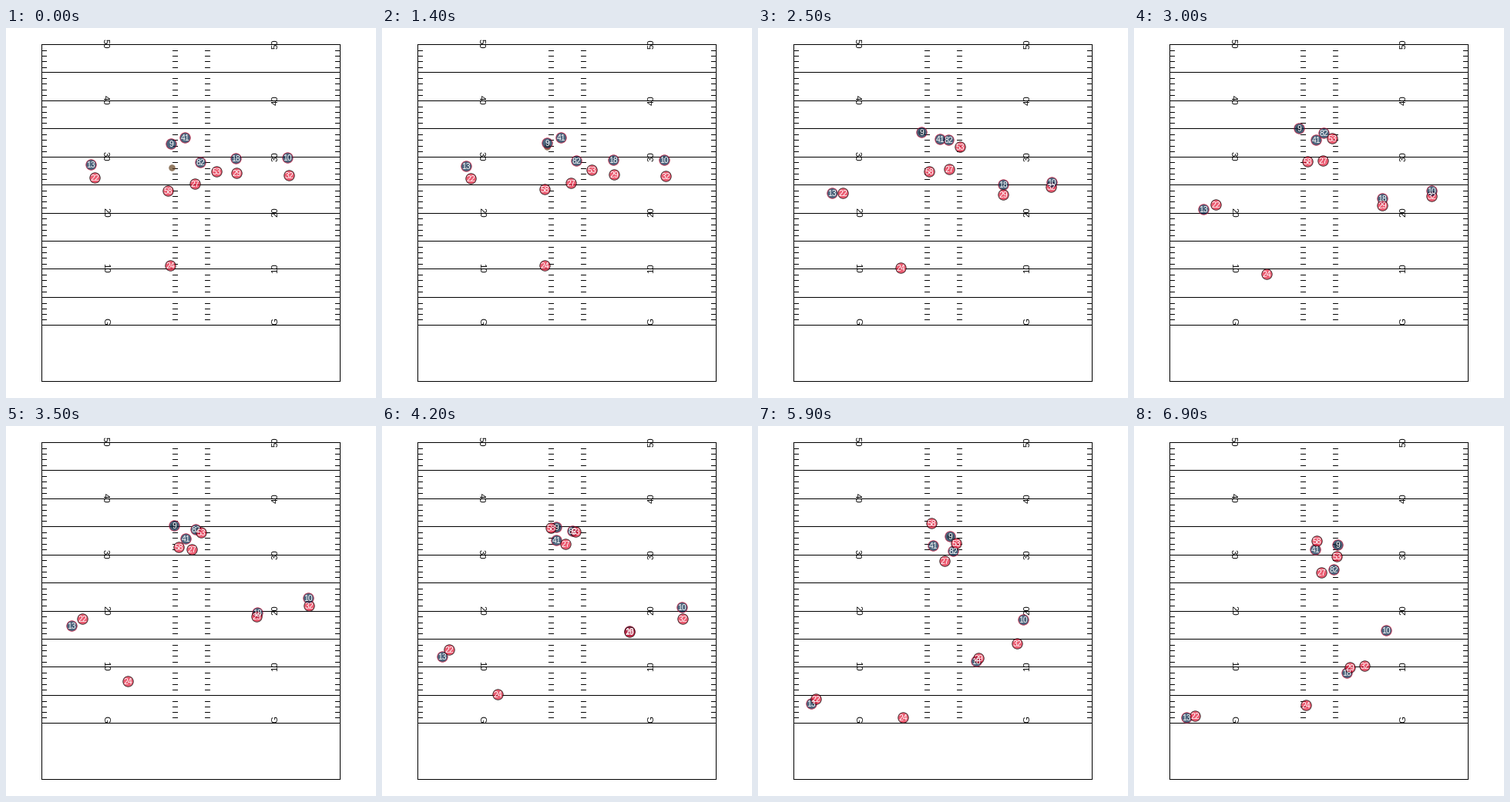
These frames come from a looping animation (480x480 px, 7000 ms). A matplotlib script:

```python
import numpy as np
import matplotlib as mpl
import matplotlib.pyplot as plt
from matplotlib.animation import FuncAnimation
from matplotlib.colors import to_rgba
from matplotlib.patches import Circle

mpl.rcParams["font.family"] = "Liberation Sans"

SIZE, DPI = 480, 72
FRAMES, STEP = 70, 100
LEFT, RIGHT, TOP, BOTTOM = 46, 433, 21, 458
YARD = (BOTTOM - TOP) / 60
RED = ("#e31837", "black")
BLUE = ("#002244", "#c60c30")
BROWN = "#654321"
SNAP, FLIGHT = 0.9, 0.6
GO, END = 1.1, 6.9

fig = plt.figure(figsize=(SIZE / DPI, SIZE / DPI), dpi=DPI, facecolor="white")
ax = fig.add_axes([0, 0, 1, 1])
ax.set_xlim(0, SIZE)
ax.set_ylim(SIZE, 0)
ax.axis("off")


def line(x0, x1, y0, y1):
    ax.plot([x0, x1], [y0, y1], color="black", lw=1, antialiased=False,
            solid_capstyle="butt", zorder=1)


def draw_field():
    for x in (LEFT, RIGHT):
        line(x, x, TOP, BOTTOM)
    for yards in [*range(0, 51, 5), 60]:
        y = round(TOP + yards * YARD)
        line(LEFT, RIGHT, y, y)
    for yards in range(50):
        if yards % 5:
            y = int(TOP + 1 + yards * YARD)
            for x in (46, 216, 258, 427):
                line(x, x + 6, y, y)
    for yards in range(0, 51, 10):
        name = str(50 - yards) if yards < 50 else "G"
        y = TOP + yards * YARD - (5 if name == "G" else 0.5)
        for x, angle in ((126, 270), (352.5, 90)):
            ax.text(x, y, name, size=11.4, rotation=angle, ha="center",
                    va="baseline", rotation_mode="anchor", zorder=1)


def disc(radius, fill, edge, lw, z):
    return ax.add_patch(Circle((0, 0), radius, facecolor=to_rgba(fill, 0.7),
                               edgecolor=to_rgba(edge, 0.7) if lw else "none",
                               lw=lw, snap=False, zorder=z))


def route(*points):
    """Stand still until GO, then run a spline with legs of equal time."""
    p = np.array(points, float)
    m = np.gradient(p, axis=0)
    m[0] = 0
    legs = len(p) - 1

    def at(t):
        s = np.clip((t - GO) / (END - GO), 0, 1) * legs
        i = min(int(s), legs - 1)
        u = s - i
        ease = u * u * (3 - 2 * u)
        return (p[i] + (p[i + 1] - p[i]) * ease
                + m[i] * u * (1 - u) ** 2 - m[i + 1] * u * u * (1 - u))
    return at


def cover(mark, *gaps):
    """Follow another player at a changing distance."""
    gap = route(*gaps)
    return lambda t: mark(t) + gap(t)


def place(shape, xy):
    shape.center = np.floor(xy + 0.5) + 0.5


class Player:
    def __init__(self, number, team, path):
        self.path = path
        self.dot = disc(6.75, *team, 0.94, 3)
        self.label = ax.text(0, 0, str(number), size=10.4, color="white",
                             ha="center", va="baseline", zorder=4)

    def move(self, t):
        place(self.dot, self.path(t))
        x, y = self.dot.center
        self.label.set_position((x, y + 3.5))


draw_field()
ball = disc(4.3, BROWN, "none", 0, 2)
ball_start = np.array([215, 181])

passer = route((214, 150), (214, 130), (236, 135), (264, 154))
wide = route((110, 177), (90, 236), (72, 336), (68, 378))
slot = route((298, 169), (318, 205), (324, 260), (289, 297), (276, 320))
tight = route((252, 174), (246, 136), (249, 144), (259, 186))

players = [
    Player(9, BLUE, passer),
    Player(13, BLUE, wide),
    Player(18, BLUE, slot),
    Player(82, BLUE, tight),
    Player(41, BLUE, route((232, 142), (236, 145), (222, 150), (235, 160))),
    Player(22, RED, cover(wide, (5, 17), (16, -6), (4, -8), (11, -2))),
    Player(29, RED, cover(slot, (1, 19), (0, 2), (4, -7))),
    Player(53, RED, cover(tight, (21, 12), (5, 2), (4, -17))),
    Player(58, RED, route((210, 211), (225, 172), (217, 115), (237, 149))),
    Player(27, RED, route((245, 202), (248, 182), (238, 153), (241, 169), (243, 190))),
    Player(24, RED, route((213, 308), (184, 312), (150, 343), (175, 379), (223, 362))),
    Player(32, RED, route((367, 191), (380, 207), (393, 246), (352, 271), (299, 311))),
    Player(10, BLUE, route((365, 168), (381, 201), (392, 232), (353, 245), (327, 265))),
]


def update(frame):
    t = frame * STEP / 1000
    for player in players:
        player.move(t)
    flight = np.clip((t - SNAP) / FLIGHT, 0, 1)
    place(ball, ball_start + (passer(t) - ball_start) * flight)


anim = FuncAnimation(fig, update, frames=FRAMES, interval=STEP, repeat=True,
                     repeat_delay=0, cache_frame_data=False)
plt.show()
```
